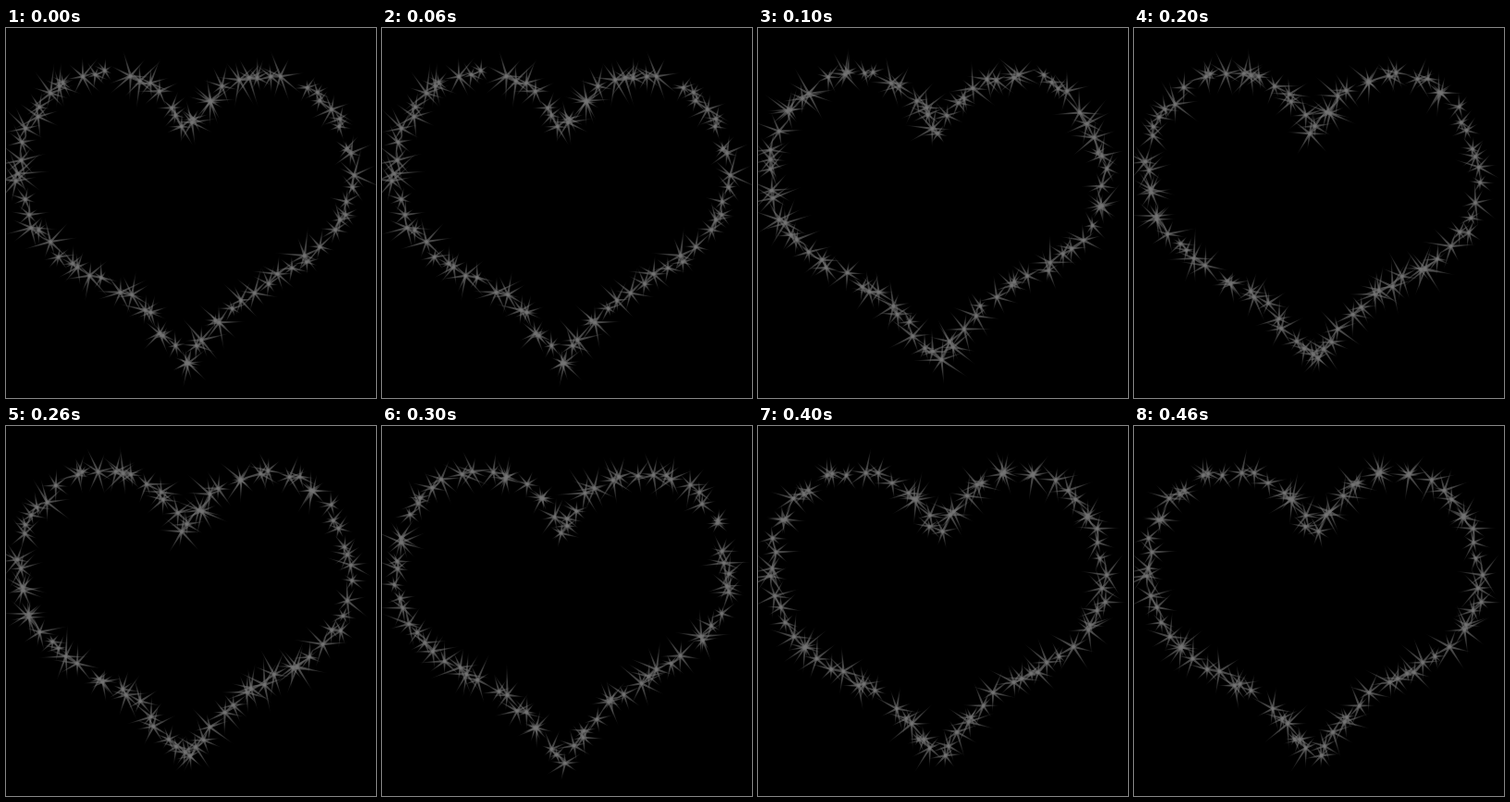
Recreate the animation shown at these times as an HTML page with a canvas. Size 400 by 400 pixels, loop 0.5 s.

```html
<!DOCTYPE html>
<html lang="en">
<head>
<meta charset="utf-8">
<title>Sparkling heart</title>
<style>
  html, body { margin: 0; width: 100%; height: 100%; overflow: hidden; background: #000; }
  canvas { display: block; }
</style>
</head>
<body>
<canvas width="400" height="400"></canvas>
<script>
const ctx = document.querySelector('canvas').getContext('2d');
const heart = document.createElementNS('http://www.w3.org/2000/svg', 'path');
heart.setAttribute('d', `M193 118 C180 75 145 50 108 50 C50 50 14 100 14 155
  C14 235 85 262 115 280 C150 296 165 326 197 364
  C215 325 250 290 290 272 C335 246 374 220 374 165
  C372 110 340 50 285 50 C240 50 208 85 193 118`);

const STARS = 76, POSES = 5, POSE_MS = 100;
const outline = heart.getTotalLength();

function seeded(seed) {
  return () => {
    seed = (seed + 0x6D2B79F5) | 0;
    let t = Math.imul(seed ^ (seed >>> 15), 1 | seed);
    t = (t + Math.imul(t ^ (t >>> 7), 61 | t)) ^ t;
    return ((t ^ (t >>> 14)) >>> 0) / 4294967296;
  };
}

// A thin, fading spike from the star's centre.
function ray(angle, length) {
  ctx.save();
  ctx.rotate(angle);
  const fade = ctx.createLinearGradient(0, 0, length, 0);
  fade.addColorStop(0, 'rgba(116,116,116,.7)');
  fade.addColorStop(0.4, 'rgba(112,112,112,.55)');
  fade.addColorStop(1, 'rgba(108,108,108,0)');
  ctx.fillStyle = fade;
  ctx.beginPath();
  ctx.moveTo(0, -1.3);
  ctx.lineTo(length, 0);
  ctx.lineTo(0, 1.3);
  ctx.fill();
  ctx.restore();
}

function star(x, y, size, random) {
  const rays = 8, turn = random() * Math.PI * 2;
  ctx.save();
  ctx.translate(x, y);
  for (let i = 0; i < rays; i++) {
    const angle = turn + (i + random() * 0.7) / rays * Math.PI * 2;
    ray(angle, size * (0.45 + 0.55 * random()));
  }
  ctx.restore();
}

function drawPose(pose) {
  const random = seeded(pose * 977 + 41);
  const jitter = () => (random() - 0.5) * 8;
  ctx.clearRect(0, 0, 400, 400);
  for (let i = 0; i < STARS; i++) {
    const p = heart.getPointAtLength((i + random()) / STARS * outline);
    const size = 17 + 20 * random();
    star(p.x + jitter(), p.y + jitter(), size, random);
  }
}

let shown = -1;
function tick() {
  const pose = Math.floor(performance.now() / POSE_MS) % POSES;
  if (pose !== shown) drawPose(shown = pose);
  requestAnimationFrame(tick);
}
tick();
</script>
</body>
</html>
```
